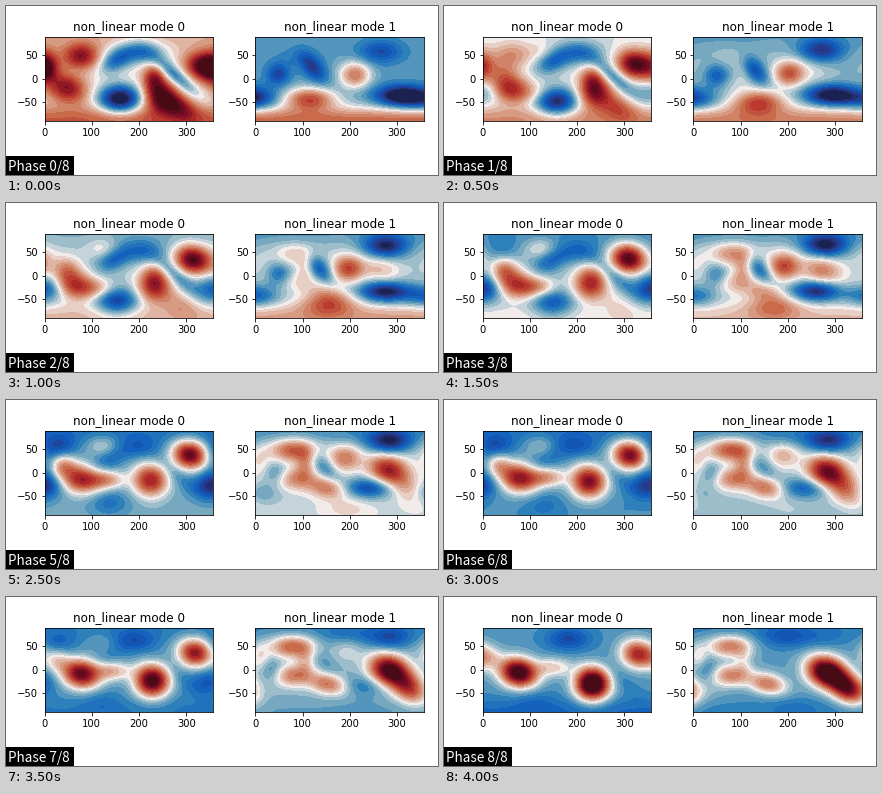
Write a matplotlib script that moves like this. It is 432x169 px and loops after 4.5 s.

```python
import numpy as np
import matplotlib.pyplot as plt
from matplotlib.animation import FuncAnimation
from matplotlib.colors import LinearSegmentedColormap
from matplotlib.patches import Rectangle

W, H, DPI = 432, 169, 72
LAST = 8
plt.rcParams["font.family"] = "DejaVu Sans"

BALANCE = LinearSegmentedColormap.from_list("balance", [
    "#181c43", "#273a8c", "#0d5bbd", "#2f81bb", "#87b1c1", "#f1eceb",
    "#daa690", "#c96b4b", "#b62e28", "#7b0d25", "#3c0911"])
LEVELS = np.linspace(-1, 1, 26)
LON, LAT = np.meshgrid(np.linspace(0, 357.5, 144), np.linspace(-90, 90, 73))


def curve(keys, t):
    """Polynomial through evenly spaced key values (Lagrange form)."""
    nodes = np.linspace(0, 1, len(keys))
    total = 0
    for i, key in enumerate(keys):
        rest = np.delete(nodes, i)
        total = total + np.array(key) * np.prod((t - rest) / (nodes[i] - rest))
    return total


def level(*amps):
    return lambda t: curve(amps, t)


def band(amps, lat, width=22):
    shape = np.exp(-((LAT - lat) / width) ** 2 / 2)
    return lambda t: curve(amps, t) * shape


def blob(amps, size, *path, tilt=0):
    """Gaussian bump that drifts along path, periodic in longitude."""
    c, s = np.cos(np.radians(tilt)), np.sin(np.radians(tilt))

    def field(t):
        x, y = curve(path, t)
        dx = (LON - x + 180) % 360 - 180
        dy = LAT - y
        u = (dx * c + dy * s) / size[0]
        v = (dy * c - dx * s) / size[1]
        return curve(amps, t) * np.exp(-(u * u + v * v) / 2)
    return field


MODE_0 = [
    level(.05, -.22, -.33),
    band((.12, -.2, 0), 90),
    band((.4, .1, -.2), -90),
    # western highs
    blob((.7, -.35, 0), (27, 19), (77, 48), (35, 55), (35, 55)),
    blob((.7, -.1, 0), (20, 25), (2, 25)),
    blob((.7, .75, 1.4), (28, 21), (48, -20), (72, -15), (76, -6), tilt=-15),
    blob((0, .5, .4), (28, 14), (95, -30), (122, -20), (150, 5)),
    blob((0, .45, .3), (18, 18), (45, 20), (42, 15), (15, 25)),
    # lows
    blob((0, -.7, 0), (25, 20), (360, -27), (358, -27), (338, -27)),
    blob((-.55, -.3, 0), (27, 17), (150, 38), (130, 22), tilt=25),
    blob((0, .25, 0), (22, 14), (125, 58)),
    blob((-.55, -.3, -.38), (34, 18), (203, 58), (203, 52), (182, 66)),
    blob((-1.2, -.35, -.12), (31, 21), (160, -43), (143, -62), (110, -65)),
    blob((-.55, -.2, -.1), (42, 13), (275, 8), (290, -20), tilt=-40),
    # eastern highs
    blob((.8, .85, 1.6), (25, 24), (247, -38), (226, -15), (233, -30)),
    blob((.6, 0, 0), (16, 20), (232, 2)),
    blob((.55, .05, 0), (28, 17), (285, -60), tilt=-25),
    blob((.8, 1.15, .98), (25, 20), (333, 27), (307, 38), (330, 33), tilt=-15),
]

MODE_1 = [
    level(-.3, -.07, -.3),
    band((0, -.25, -.1), 90),
    band((.7, .1, -.1), -90),
    # western lows
    blob((-.45, -.3, -.2), (18, 17), (48, 10), (47, 0), (25, 0)),
    blob((-.5, -.4, 0), (26, 15), (122, 24), (146, 10), (148, 15), tilt=-50),
    # ring of highs
    blob((-.1, .5, .65), (32, 16), (88, 47), (76, 50)),
    blob((0, .3, .6), (28, 16), (92, -15), (78, -12)),
    blob((0, .4, .65), (28, 15), (145, -35), (157, -30), tilt=-12),
    blob((0, .3, .2), (13, 22), (105, 18)),
    blob((0, .1, .3), (14, 22), (10, 25)),
    # southern and central highs
    blob((.75, .25, -.1), (38, 17), (115, -43), (185, -72), (215, -80)),
    blob((.65, .55, 0), (23, 19), (211, 8), (190, 26), (200, 55)),
    # eastern centres
    blob((0, .6, 1.4), (29, 22), (245, 18), (278, 8), (281, -4), tilt=-20),
    blob((0, .2, 1), (28, 20), (325, -38), tilt=-40),
    blob((-.9, -.75, 0), (37, 16), (308, -37), (250, -32), (225, -36)),
    blob((-.45, -.35, .2), (34, 17), (0, -44)),
    blob((-.4, -.85, -.1), (33, 18), (266, 58), (282, 65), (286, 66)),
    blob((0, 0, -.3), (40, 18), (198, 70)),
]

fig = plt.figure(figsize=(W / DPI, H / DPI), dpi=DPI, facecolor="white")


def panel(left, title):
    ax = fig.add_axes([left / W, 54 / H, 168.7 / W, 84.5 / H])
    ax.set_title(title, fontsize=12)
    ax.set_xticks(range(0, 301, 100))
    ax.set_yticks([-50, 0, 50])
    ax.tick_params(labelsize=10)
    return ax


panels = [(panel(38.6, "non_linear mode 0"), MODE_0),
          (panel(249.4, "non_linear mode 1"), MODE_1)]

fig.add_artist(Rectangle((0, 0), 68, 19, color="black", lw=0, transform=None))
label = fig.text(2 / W, 3.7 / H, "", color="white", fontsize=13.5,
                 family="Noto Sans CJK JP", va="baseline", zorder=5)
filled = []


def draw(phase):
    while filled:
        filled.pop().remove()
    for ax, parts in panels:
        z = np.clip(sum(p(phase / LAST) for p in parts), -.999, .999)
        filled.append(ax.contourf(LON, LAT, z, LEVELS, cmap=BALANCE))
        ax.set_xlim(0, 357.5)
        ax.set_ylim(-90, 90)
    label.set_text(f"Phase {phase}/{LAST}")
    return []


anim = FuncAnimation(fig, draw, frames=LAST + 1, init_func=lambda: draw(0),
                     interval=500, repeat=True, repeat_delay=0, blit=False)
plt.show()
```
